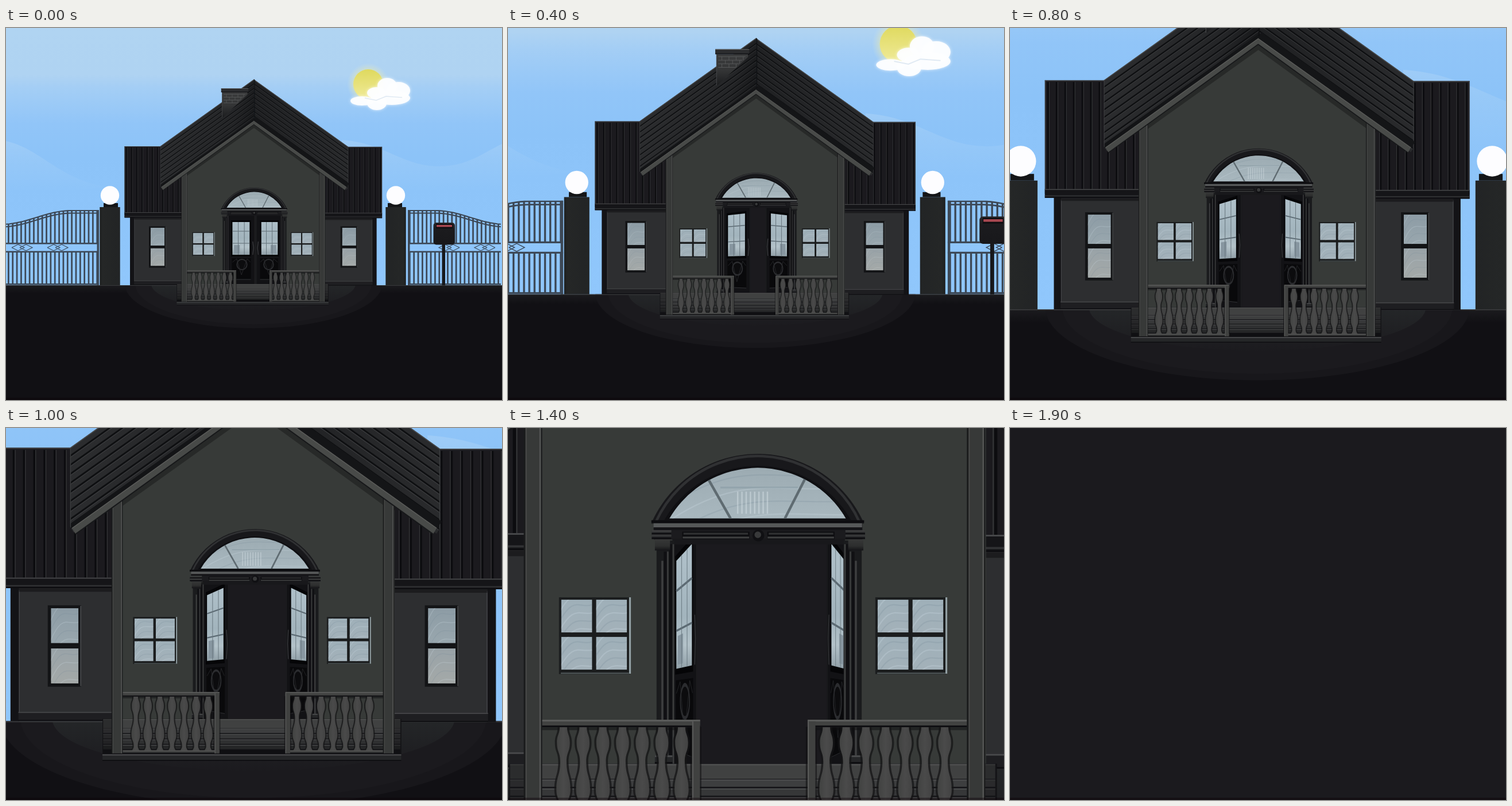
Animation, 864 px wide and 648 px high, one loop 2100 ms. Source, as an HTML page with a canvas:

```html
<!DOCTYPE html>
<html lang="en">
<head>
<meta charset="utf-8">
<title>Walk up to the house</title>
<style>
html, body { margin: 0; width: 100%; height: 100%; overflow: hidden; background: #111014; }
canvas { display: block; width: 864px; height: 648px; }
</style>
</head>
<body>
<canvas id="stage" width="864" height="648"></canvas>
<script>
const W = 864, H = 648, STEP = 100, LOOP = 2100, LAST = 19;
const FOCUS = { x: 431, y: 383.3 };
const INSIDE = '#1b1a1e';
const g = document.getElementById('stage').getContext('2d');

// Drawing helpers
function rect(fill, x, y, w, h) {
  g.fillStyle = fill;
  g.fillRect(x, y, w, h);
}
function trace(pts) {
  g.beginPath();
  for (let i = 0; i < pts.length; i += 2) g.lineTo(pts[i], pts[i + 1]);
}
function poly(fill, ...pts) {
  trace(pts);
  g.closePath();
  g.fillStyle = fill;
  g.fill();
}
function line(color, width, ...pts) {
  trace(pts);
  g.strokeStyle = color;
  g.lineWidth = width;
  g.stroke();
}
function oval(fill, x, y, rx, ry = rx) {
  g.beginPath();
  g.ellipse(x, y, rx, ry, 0, 0, 7);
  g.fillStyle = fill;
  g.fill();
}
function fade(x0, y0, x1, y1, ...stops) {
  const grad = g.createLinearGradient(x0, y0, x1, y1);
  for (let i = 0; i < stops.length; i += 2) grad.addColorStop(stops[i], stops[i + 1]);
  return grad;
}
function bevel(fill, light, x, y, w, h) {
  rect(fill, x, y, w, h);
  rect(light, x, y, w, 0.9);
  rect('#0d0d10', x, y + h - 0.9, w, 0.9);
}
function clipped(path, draw) {
  g.save();
  path();
  g.clip();
  draw();
  g.restore();
}
function box(x, y, w, h) {
  g.beginPath();
  g.rect(x, y, w, h);
}
function mirrored(draw, axis = FOCUS.x, drop = 0) {
  draw();
  g.save();
  g.translate(axis * 2, drop);
  g.scale(-1, 1);
  draw();
  g.restore();
}

// Marbled glass
function pane(x, y, w, h, top = '#9fb0b9', bottom = '#a3b1b9') {
  clipped(() => box(x, y, w, h), () => {
    rect(fade(0, y, 0, y + h, 0, top, 1, bottom), x, y, w, h);
    for (let i = 0; i < 5; i++) {
      g.beginPath();
      g.moveTo(x - 2, y + h * (0.5 + i * 0.28));
      g.bezierCurveTo(x + w * 0.4, y + h * (i * 0.3 - 0.5), x + w * 0.6, y + h * (0.1 + i * 0.2), x + w, y + h * (i * 0.25 - 0.1));
      g.strokeStyle = i % 2 ? 'rgba(112,132,144,.2)' : 'rgba(215,228,234,.22)';
      g.lineWidth = 0.7;
      g.stroke();
    }
  });
}

function sky() {
  rect(fade(0, 0, 0, 450, 0, '#b0d4f2', 0.18, '#afd3f2', 0.23, '#a4cef5', 0.37, '#91c5f8', 0.5, '#8cc3f8', 1, '#90c7fc'), 0, 0, W, 450);
  g.fillStyle = fade(0, 195, 0, 285, 0, 'rgba(190,220,245,.32)', 1, 'rgba(190,220,245,0)');
  g.beginPath();
  g.moveTo(0, 197);
  g.bezierCurveTo(60, 210, 90, 262, 175, 277);
  g.lineTo(0, 300);
  g.fill();
  g.beginPath();
  g.moveTo(585, 195);
  g.bezierCurveTo(660, 200, 690, 241, 755, 241);
  g.bezierCurveTo(805, 241, 835, 215, 864, 202);
  g.lineTo(864, 300);
  g.lineTo(585, 300);
  g.fill();
}

function sun() {
  const glow = g.createRadialGradient(631, 98, 22, 631, 98, 37);
  glow.addColorStop(0, 'rgba(240,235,150,.65)');
  glow.addColorStop(1, 'rgba(220,230,220,0)');
  oval(glow, 631, 98, 37);
  oval(fade(0, 72, 0, 125, 0, '#dfd95e', 1, '#f0eb9a'), 631, 98, 26);
  g.save();
  g.shadowColor = 'rgba(255,255,255,.8)';
  g.shadowBlur = 5;
  const puffs = [[620, 127, 20, 8], [646, 131, 17, 12], [645, 113, 16, 10], [664, 101, 17, 14], [684, 109, 20, 15], [672, 122, 32, 12]];
  puffs.forEach(p => oval('rgba(253,254,255,.93)', ...p));
  g.restore();
  line('rgba(205,220,235,.6)', 1.5, 625, 122, 645, 126, 662, 119, 690, 121);
}

function gate() {
  const steel = '#3c4856';
  const top = x => 318 + 24 * (0.5 + 0.5 * Math.cos(Math.PI * Math.min(1, Math.max(0, (x + 8) / 122))));
  for (let x = 3; x < 158; x += 7.35) {
    rect(steel, x, top(x), 2.7, 376 - top(x));
    rect(steel, x, 390, 2.7, 57);
  }
  for (const dy of [0, 4.5]) {
    const curve = [];
    for (let x = 0; x <= 162; x += 6) curve.push(x, top(x) + dy);
    line(steel, 2.2, ...curve);
  }
  for (const y of [374, 388.5, 445]) rect(steel, 0, y, 162, 2.6);
  for (const x of [28, 90]) {
    for (const dx of [-7, 7]) {
      line(steel, 1.1, x + dx - 11, 382.5, x + dx, 377, x + dx + 11, 382.5, x + dx, 388, x + dx - 11, 382.5);
    }
  }
  rect(steel, 158.5, 317, 3.5, 131);
}

function gatePost() {
  rect(fade(163, 0, 199, 0, 0, '#1d1f1f', 0.15, '#252727', 1, '#222425'), 163.3, 312, 35.4, 136);
  rect('#151618', 170, 305, 25, 7);
  oval('#fdfdff', 181, 291.5, 16.2);
}

function mailbox() {
  rect('#17181b', 759.5, 375, 5.5, 73);
  g.beginPath();
  g.roundRect(744.5, 339, 37.5, 38.5, 5);
  g.fillStyle = fade(0, 339, 0, 377, 0, '#2a2a2d', 0.3, '#1b1b1e', 1, '#18181b');
  g.fill();
  rect('#0d0d10', 749, 341, 29, 8);
  rect('#a84851', 750, 343, 27, 3.6);
}

function ground() {
  rect('#111014', 0, 448, W, 200);
  rect(fade(0, 448, 0, 462, 0, '#1b1b1e', 1, '#111014'), 0, 448, W, 14);
  clipped(() => box(0, 448, W, 200), () => {
    oval('#18171b', 431, 446, 224, 77);
    oval('#1b1a1e', 431, 446, 206, 70);
    oval(fade(0, 448, 0, 494, 0, '#242628', 1, '#1b1a1e'), 431, 446, 178, 46);
  });
  rect('#3c3d3f', 0, 448, W, 0.9);
}

function wing() {
  rect('#2d2e30', 217, 328, 92, 120);
  rect('#131316', 216, 330, 7.5, 118);
  rect('#45464a', 223.5, 332, 0.7, 110);
  bevel('#1e1e21', '#48494b', 223, 439.8, 84, 8);
  rect(INSIDE, 206.5, 206, 102, 120);
  for (let x = 207; x < 308; x += 9.05) {
    rect('#0c0c0f', x + 2, 208, 1.8, 114);
    rect('#343537', x + 3.8, 208, 0.7, 114);
  }
  rect('#3b3c3e', 206.5, 206, 0.9, 124);
  rect('#404143', 206.5, 206, 66, 1);
  bevel('#151518', '#47484a', 206.5, 321, 102, 9.3);
  rect('#303133', 206.5, 327.6, 102, 1.2);
  rect('rgba(8,8,10,.45)', 223.5, 330.5, 84, 3);
}

function tallWindow(x) {
  rect('#131416', x, 345.5, 29.5, 72);
  rect('#4a4c4e', x + 28.8, 346, 0.8, 71);
  pane(x + 2.8, 348, 24.4, 31, '#8d9ca5', '#99a7ae');
  pane(x + 2.8, 383.6, 24.4, 31, '#99a3a8', '#a4a9a8');
}

function gable() {
  poly('#373a38', 432, 165, 556, 255, 556, 448, 306, 448, 306, 255);
  line('rgba(20,22,22,.45)', 5, 306, 261, 432, 171, 556, 261);
}

function mainRoof() {
  const side = shade => clipped(() => trace([432.5, 89, 268.8, 206, 268.8, 276, 272, 281, 432.5, 165]), () => {
    rect(shade, 268, 88, 166, 200);
    for (let i = 1; i < 10; i++) {
      const y = i * 8;
      line('#0e0f11', 1.5, 268, 206 + y, 433, 88.5 + y);
      line('#3a3b3d', 0.6, 268, 207.3 + y, 433, 89.8 + y);
    }
    line('#131416', 3.5, 268, 276, 433, 159);
    line('#4a4b4c', 1.6, 268, 206.5, 433, 89);
    rect('#3b3c3e', 268.6, 206, 0.9, 74);
  });
  side(fade(300, 130, 432, 160, 0, '#2b2c2e', 0.75, '#242527', 1, '#17181a'));
  g.save();
  g.translate(865, 1);
  g.scale(-1, 1);
  side(fade(300, 130, 432, 160, 0, '#292a2c', 1, '#1f2022'));
  g.restore();
  line('#141517', 9, 595, 275, 432.5, 159);
  line('#0f1012', 1.3, 432.8, 90, 432.8, 160);
  mirrored(() => {
    poly('#484a48', 270.5, 277.3, 432, 162, 432, 168, 273.6, 282.5);
    line('#5a5b59', 0.8, 270.5, 277.3, 432, 162);
    line('#17181a', 1, 273.6, 282.5, 432, 168);
  }, 431.8);
}

function chimney() {
  poly(fade(0, 112, 0, 157, 0, '#3a3b3c', 0.5, '#343536', 1, '#1a1b1d'), 376.4, 112, 420.6, 112, 420.6, 116, 376.4, 157);
  for (let row = 0; row < 4; row++) {
    const y = 115.5 + row * 5, end = 417 - row * 4.5;
    line('#5b5c5d', 0.7, 379, y, end, y);
    for (let x = 384 + (row % 2) * 5; x < end - 2 && row < 3; x += 10) line('#5b5c5d', 0.7, x, y, x, y + 5);
  }
  line('#47484a', 0.8, 376.6, 112, 376.6, 156);
  bevel('#2b2c2e', '#5e5f60', 374.8, 105, 47.4, 7);
}

function smallWindow(x) {
  rect('#1b1d1e', x, 355.8, 38.5, 41.6);
  rect('#929fa3', x + 38, 355.8, 1, 41.4);
  rect('#4c5355', x + 1, 396.6, 37, 0.7);
  for (const px of [1.2, 20.1]) {
    for (const py of [357.1, 377.2]) pane(x + px, py, 16.8, 17.8);
  }
}

function fanlight() {
  // Circular segment standing on a flat base
  const segment = (half, rise, base) => {
    const r = (half * half + rise * rise) / (2 * rise), a = Math.asin(half / r);
    g.beginPath();
    g.arc(432.2, base - rise + r, r, -Math.PI / 2 - a, -Math.PI / 2 + a);
    g.closePath();
  };
  segment(57.7, 37.8, 315.8);
  g.fillStyle = '#18181b';
  g.fill();
  segment(55.2, 35.8, 315);
  g.strokeStyle = '#303133';
  g.lineWidth = 1.4;
  g.stroke();
  segment(50.5, 29.3, 313.8);
  g.fillStyle = '#0f0f12';
  g.fill();
  clipped(() => segment(47.8, 27.4, 313), () => {
    pane(384, 285, 97, 29, '#9cabb2', '#a9b8bf');
    rect('rgba(125,145,155,.4)', 412, 295.8, 42, 1);
    for (let x = 421; x < 438; x += 2.3) rect('rgba(222,232,238,.4)', x, 298.5, 0.8, 12);
    line('#5f6b71', 1.4, 417.5, 313, 405, 291);
    line('#5f6b71', 1.4, 447, 313, 458.7, 290);
  });
}

function door(hinge, free, step) {
  const eye = 410, swing = step * 0.014;
  const at = (u, v) => [hinge + (free - hinge) * u, eye + (v - eye) * (1 + swing * u)];
  const quad = (fill, u0, v0, u1, v1) => poly(fill, ...at(u0, v0), ...at(u1, v0), ...at(u1, v1), ...at(u0, v1));
  const width = Math.abs(free - hinge), thin = width / 45;
  quad('#121215', 0, 320, 1, 447);
  quad('#1d1e20', 0.97, 320, 1, 447);
  quad('#050507', 0.09, 335, 0.84, 398);
  quad(fade(0, 335, 0, 397, 0, '#aebfc8', 0.5, '#a2b4bd', 0.75, '#b3c2c9', 1, '#8b9aa2'), 0.14, 338, 0.79, 395);
  quad('#8796a0', 0.2, 378, 0.42, 393);
  for (const v of [354, 375]) line('#5c6a73', 1.1, ...at(0.14, v), ...at(0.79, v));
  for (const u of [0.36, 0.59]) line('#67757d', thin, ...at(u, 338), ...at(u, 395));
  quad('#09090b', 0.12, 401, 0.84, 438);
  const [cx, cy] = at(0.5, 412);
  oval('#2b2c2f', cx, cy, width * 0.21, 10);
  oval('#0c0c0e', cx, cy, width * 0.17, 8);
  line('#2b2c2f', 0.8 * thin, ...at(0.14, 408), ...at(0.3, 402), ...at(0.48, 430), ...at(0.7, 402), ...at(0.82, 408));
  line('#3a3b3e', 0.8 * thin, ...at(0.12, 438), ...at(0.84, 438));
  line('#3b3c3f', 1.3 * thin, ...at(0.91, 372), ...at(0.94, 383), ...at(0.91, 395));
}

function doorway(step) {
  rect(INSIDE, 387, 326, 92.5, 121);
  clipped(() => box(387.2, 327, 91.6, 119), () => {
    // Hinges slide behind the frame while the leaves swing
    const slide = 0.12 * step;
    door(388 - slide, 434 - 2.48 * step, step);
    door(479.5 + slide, 435.5 + 2.45 * step, step);
  });
  rect('#1b1b1e', 376, 314.5, 113, 10);
  rect('#18181b', 386, 324, 93.5, 3.1);
  mirrored(() => {
    rect('#1a1b1d', 377.4, 325, 9.8, 121);
    rect('#3d3e3f', 380, 336, 1.1, 110);
    rect('#101013', 381.3, 331, 1.5, 115);
    rect('#3b3c3d', 383.1, 331, 0.8, 115);
    rect('#101013', 384.2, 327, 1.6, 119);
    rect('#3b3c3d', 386.1, 327, 0.8, 119);
    rect(fade(0, 324.4, 0, 330.4, 0, '#363737', 0.6, '#2d2e2e', 1, '#141417'), 376.5, 324.4, 8.2, 6);
    bevel('#252628', '#4a4b4c', 376.5, 441.5, 9.5, 4.5);
  }, 433);
  rect('#0c0c0f', 374.6, 314, 115.3, 1.4);
  rect('#565859', 375.8, 315.7, 113, 2.2);
  rect('#131316', 375.8, 317.9, 113, 1.4);
  mirrored(() => {
    bevel('#2a2b2d', '#3c3d3e', 374.8, 319.4, 10.6, 2.4);
    bevel('#2a2b2d', '#373839', 374.8, 321.8, 10.6, 2.4);
    rect('#0e0e11', 391.3, 320.2, 36.5, 4.1);
    rect('#303132', 392, 320.8, 35, 1);
    rect('#3d3e3f', 391.6, 322.9, 36, 1);
  }, 432.6);
  oval('#101013', 432.6, 322.3, 3.2);
  oval('#38393a', 432.3, 321.9, 1.8);
}

function steps() {
  rect('#161619', 297.4, 446, 264.4, 32);
  rect('#404141', 298, 446.2, 263, 8);
  rect('#505151', 298, 446.2, 263, 0.7);
  ['#3d3e3f', '#363738', '#2f3031', '#252627'].forEach((shade, i) => {
    const y = 454.6 + i * 4.8;
    rect(shade, 298, y, 263, 3.9);
    rect('#4c4d4e', 298, y, 263, 0.6);
  });
  rect('#0f0f12', 298, 473, 263, 4.5);
  rect('rgba(18,18,21,.45)', 297.4, 446, 9, 32);
  rect('rgba(18,18,21,.45)', 555, 446, 7, 32);
  bevel('#252628', '#505153', 297.4, 477.4, 264.4, 5.8);
}

function baluster(x) {
  const profile = [[2, 426], [3.5, 434.5], [1.7, 445], [3.8, 460], [1.8, 470], [3.2, 475]];
  const outline = grow => {
    g.beginPath();
    for (const side of [1, -1]) {
      const pts = side > 0 ? profile : [...profile].reverse();
      pts.forEach(([w, y], i) => {
        const px = x + (w + grow) * side;
        if (!i) return g.lineTo(px, y);
        const [w0, y0] = pts[i - 1], mid = (y0 + y) / 2;
        g.bezierCurveTo(x + (w0 + grow) * side, mid, px, mid, px, y);
      });
    }
  };
  outline(1.1);
  g.fillStyle = 'rgba(20,21,22,.75)';
  g.fill();
  outline(0);
  g.fillStyle = fade(x - 4, 0, x + 4, 0, 0, '#414241', 0.5, '#4a4a4a', 1, '#424242');
  g.fill();
}

function railing(x, post, first) {
  rect('rgba(15,15,17,.5)', x, 426, 86.5, 1.8);
  for (let i = 0; i < 7; i++) baluster(first + i * 10.68);
  rect('rgba(15,15,17,.6)', post - 1, 426, 6, 50);
  bevel('#414241', '#5c5d5c', x, 422.2, 86.5, 4);
  bevel('#3c3d3d', '#535453', x, 473.8, 86.5, 3);
  rect('#404140', post, 423, 4.2, 53.5);
  rect('#585958', post, 423, 0.7, 53.5);
}

function porchPost(x) {
  const top = 250, tall = 226.5;
  rect('#1a1b1c', x - 1, top, 10, tall);
  rect('#373938', x, top, 8.3, tall);
  rect('#545554', x + 7.5, top, 0.8, tall);
  rect('#4a4b4a', x, top, 0.6, tall);
}

function scene(step) {
  sky();
  sun();
  mirrored(gate);
  mirrored(gatePost, 430);
  ground();
  mailbox();
  mirrored(wing, 430.8, 0.9);
  tallWindow(249);
  tallWindow(582.7);
  gable();
  smallWindow(324.5);
  smallWindow(496);
  fanlight();
  doorway(step);
  steps();
  railing(314.5, 396.7, 326.9);
  railing(459.3, 459.3, 469.5);
  porchPost(306.4);
  porchPost(546.6);
  mainRoof();
  chimney();
}

// The visible width shrinks evenly, a little slower at the threshold.
const span = step => 1 - 0.0492 * Math.min(step, 14) - 0.0428 * Math.max(0, step - 14);

function render(step) {
  const zoom = 1 / span(step);
  g.setTransform(zoom, 0, 0, zoom, FOCUS.x * (1 - zoom), FOCUS.y * (1 - zoom));
  if (step < LAST) scene(step);
  g.setTransform(1, 0, 0, 1, 0, 0);
  if (step === LAST) rect(INSIDE, 0, 0, W, H);
  rect('rgba(10,0,6,.4)', 0, 644, W, 4);
}

let shown = -1;
const start = performance.now();
function tick(now) {
  const time = Math.max(0, now - start) % LOOP;
  const step = Math.min(LAST, Math.floor(time / STEP));
  if (step !== shown) render(shown = step);
  requestAnimationFrame(tick);
}
tick(start);
</script>
</body>
</html>
```
